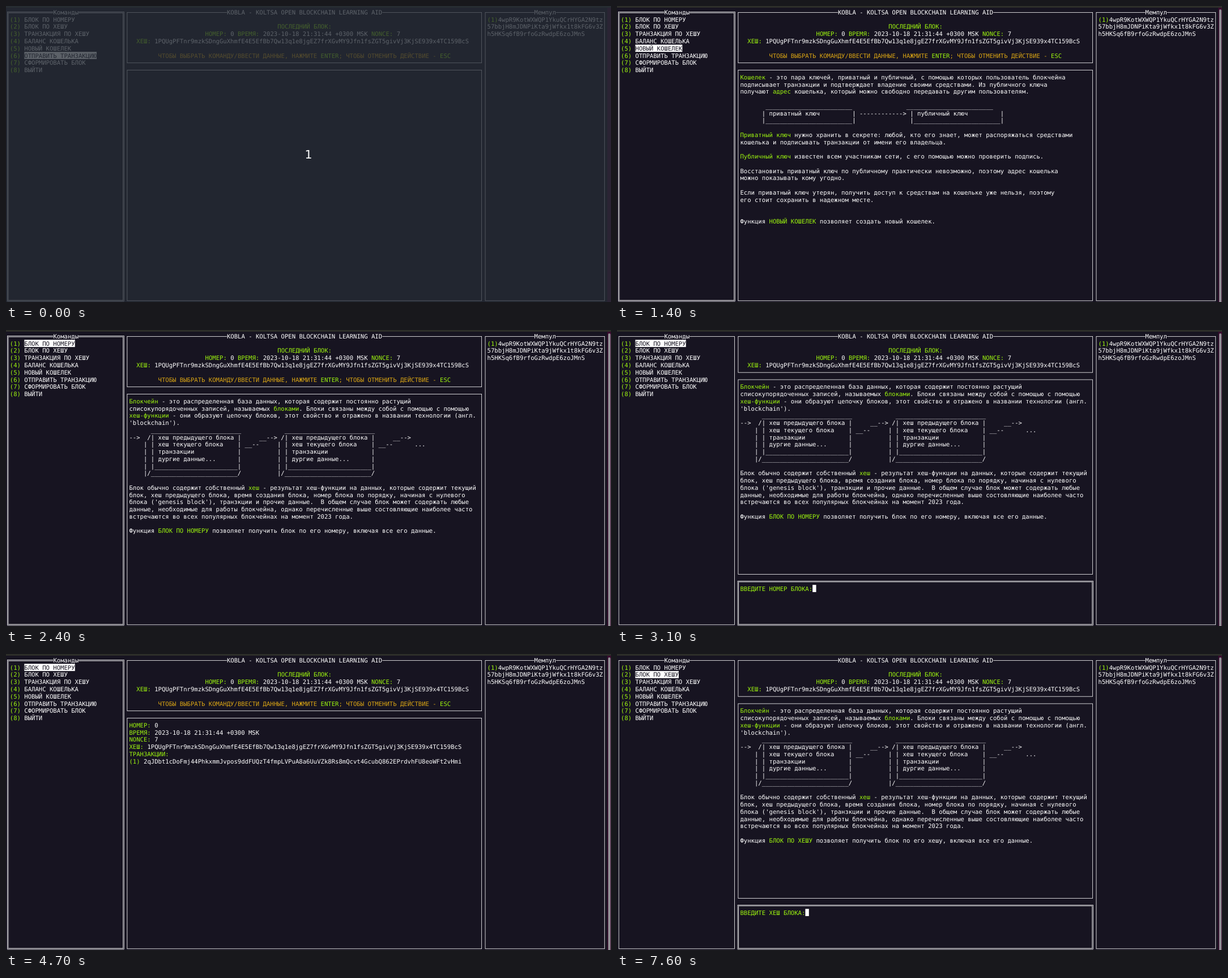
These frames come from a looping animation (1068 by 524 pixels, 8000 ms). An HTML page:

```html
<!DOCTYPE html>
<html lang="ru">
<head>
<meta charset="utf-8">
<title>KOBLA</title>
<style>
  html, body { margin: 0; width: 100%; height: 100%; overflow: hidden; background: #171421; }
  svg { display: block; width: 1068px; height: 524px; }
  text { font: 10.605px "DejaVu Sans Mono", monospace; white-space: pre; text-rendering: geometricPrecision; }
  .count { font: 20.5px "DejaVu Sans", sans-serif; }
</style>
</head>
<body>
<svg id="stage" viewBox="0 0 1068 524"></svg>
<script>
const LOOP = 8000;
// The terminal has cells of 8 by 16 units, shown at scale U.
const U = 0.798, CW = 6.385, RH = 12.76;
const BG = '#171421', FG = '#ffffff', GREEN = '#9df50f', GOLD = '#daa514';
const stage = document.getElementById('stage');

const colX = c => 0.4 + c * CW;
const rowY = r => 4.6 + r * RH;
const bar = n => '_'.repeat(n);
const rect = (x, y, w, h, fill, extra = '') =>
  `<rect x="${x}" y="${y}" width="${w}" height="${h}" fill="${fill}" ${extra}/>`;
const cells = (c, r, n, fill = FG) => rect(colX(c), rowY(r), n * CW, RH, fill);

// Text on the character grid; {braces} mark green parts.
function print(c, r, s, fill = FG) {
  const body = s.replace(/\{(.*?)\}/g, `<tspan fill="${GREEN}">$1</tspan>`);
  return `<text x="${colX(c)}" y="${rowY(r) + 13 * U}" fill="${fill}">${body}</text>`;
}

function frame(c0, r0, c1, r1, { double = false, title = '', at = 0 } = {}) {
  const x = colX(c0) + 3.5 * U, y = rowY(r0) + 8.5 * U;
  const w = (c1 - c0) * CW, h = (r1 - r0) * RH;
  let out = '';
  for (const d of double ? [-U, U] : [0]) {
    out += rect(x + d, y + d, w - 2 * d, h - 2 * d, 'none', `stroke="${FG}" stroke-width="${U}"`);
  }
  if (title) out += cells(at, r0, title.length, BG) + print(at, r0, title);
  return out;
}

const menu = ['БЛОК ПО НОМЕРУ', 'БЛОК ПО ХЕШУ', 'ТРАНЗАКЦИЯ ПО ХЕШУ', 'БАЛАНС КОШЕЛЬКА',
  'НОВЫЙ КОШЕЛЕК', 'ОТПРАВИТЬ ТРАНЗАКЦИЮ', 'СФОРМИРОВАТЬ БЛОК', 'ВЫЙТИ'];
const hash = '1PQUgPFTnr9mzkSDngGuXhmfE4E5EfBb7Qw13q1e8jgEZ7frXGvMY9Jfn1fsZGT5givVj3KjSE939x4TC159BcS';
const stamp = '2023-10-18 21:31:44 +0300 MSK';
const mempool = ['{(1)}4wpR9KotWXWQP1YkuQCrHYGA2N9tz', '57bbjH8mJDNPiKta9jWfkx1t8kFG6v3Z',
  'h5HKSq6fB9rfoGzRwdpE6zoJMnS'];

const blockPage = (name, key) => `{Блокчейн} - это распределенная база данных, которая содержит постоянно растущий
списокупорядоченных записей, называемых {блоками}. Блоки связаны между собой с помощью с помощью
{хеш-функции} - они образуют цепочку блоков, этот свойство и отражено в названии технологии (англ.
'blockchain').
      ${bar(25)}            ${bar(25)}
-->  /| хеш предыдущего блока |     __--> /| хеш предыдущего блока |     __-->
    | | хеш текущего блока    | __--     | | хеш текущего блока    | __--      ...
    | | транзакции            |          | | транзакции            |
    | | дургие данные...      |          | | дургие данные...      |
    | |${bar(23)}|          | |${bar(23)}|
    |/${bar(24)}/          |/${bar(24)}/

Блок обычно содержит собственный {хеш} - результат хеш-функции на данных, которые содержит текущий
блок, хеш предыдущего блока, время создания блока, номер блока по порядку, начиная с нулевого
блока ('genesis block'), транзкции и прочие данные.  В общем случае блок может содержать любые
данные, необходимые для работы блокчейна, однако перечисленные выше состовляющие наиболее часто
встречаются во всех популярных блокчейнах на момент 2023 года.

Функция {${name}} позволяет получить блок по его ${key}, включая все его данные.`;

const row = (a, link, b) => `      | ${a.padEnd(40)}| ${link.padEnd(13)} | ${b.padEnd(22)}|`;
const txPage = `{Транзакция} - это одно подписанное сообщение, которое хранится в блоках блокчейна. Если смотреть
на блокчейн как на базу данных, то транзакция - это одна запись в этой базе. Идентификатором
транзакции служит {хеш} - результат хеш-функции на данных, которые содержит транзакция.

     Блок:${' '.repeat(53)}Транзакция:
       ${bar(42)}               ${bar(24)}
${row('хеш блока, хеш предыдущего блока и тд...', '', 'хеш')}
${row('-'.repeat(40), '', 'отправитель')}
${row('транзакция_1', '-'.repeat(12) + '>', 'подпись')}
${row('транзакция_2', '', 'дополнительные данные')}
${row('...', '', '...')}
      | ${'транзакция_N'.padEnd(40)}|               |${bar(23)}|
      |${bar(41)}|


Многие люди считают, что транзакции нужны исключительно для передачи {цифровых активов} - токенов,
однако возможности транзакций этим не ограничены, например, транзакция может содержать в себе
дополнительные данные - сообщение, как в банковском переводе, или другие данные, которые
отправитель хочет сохранить в блокчейне, например, фотографию.

Функция {ТРАНЗАКЦИЯ ПО ХЕШУ} позволяет получить транзакцию по ее хешу, включая все ее данные.`;

const walletIntro = `{Кошелек} - это пара ключей, приватный и публичный, с помощью которых пользователь блокчейна
подписывает транзакции и подтверждает владение своими средствами. Из публичного ключа
получают {адрес} кошелька, который можно свободно передавать другим пользователям.
`;
const balancePage = `${walletIntro}
{Баланс} кошелька складывается из всех транзакций, в которых участвовал его адрес. Чтобы узнать
баланс, достаточно просмотреть все блоки, начиная с нулевого, и сложить полученные средства,
вычитая отправленные.

Функция {БАЛАНС КОШЕЛЬКА} позволяет получить баланс кошелька по его адресу.`;
const walletPage = `${walletIntro}
       ${bar(24)}               ${bar(24)}
      | приватный ключ         | ------------> | публичный ключ         |
      |${bar(24)}|               |${bar(24)}|

{Приватный ключ} нужно хранить в секрете: любой, кто его знает, может распоряжаться средствами
кошелька и подписывать транзакции от имени его владельца.

{Публичный ключ} известен всем участникам сети, с его помощью можно проверить подпись.

Восстановить приватный ключ по публичному практически невозможно, поэтому адрес кошелька
можно показывать кому угодно.

Если приватный ключ утерян, получить доступ к средствам на кошельке уже нельзя, поэтому
его стоит сохранить в надежном месте.


Функция {НОВЫЙ КОШЕЛЕК} позволяет создать новый кошелек.`;

const resultPage = `{НОМЕР:} 0
{ВРЕМЯ:} ${stamp}
{NONCE:} 7
{ХЕШ:} ${hash}
{ТРАНЗАКЦИИ:}
{(1)} 2qJDbt1cDoFmj44PhkxmmJvpos9ddFUQzT4fmpLVPuA8a6UuVZk8Rs8mQcvt4GcubQ862EPrdvhFU8eoWFt2vHmi`;

const byNumber = blockPage(menu[0], 'номеру');
const byHash = blockPage(menu[1], 'хешу');
const askNumber = 'ВВЕДИТЕ НОМЕР БЛОКА:', askHash = 'ВВЕДИТЕ ХЕШ БЛОКА:';

const steps = [
  { t: 0, sel: 6, page: '', count: '1' },
  { t: 100, sel: 6, page: '' },
  { t: 500, sel: 6, page: '' },
  { t: 1400, sel: 5, page: walletPage },
  { t: 1500, sel: 4, page: balancePage },
  { t: 1800, sel: 3, page: txPage },
  { t: 2000, sel: 2, page: byHash },
  { t: 2400, sel: 1, page: byNumber },
  { t: 3100, sel: 1, page: byNumber, ask: askNumber, typed: '', cursor: true },
  { t: 3700, sel: 1, page: byNumber, ask: askNumber, typed: '0', cursor: true },
  { t: 4200, sel: 1, page: byNumber, ask: askNumber, typed: '0' },
  { t: 4600, sel: 1, page: byNumber },
  { t: 4700, sel: 1, page: resultPage },
  { t: 6800, sel: 2, page: byHash },
  { t: 7600, sel: 2, page: byHash, ask: askHash, typed: '', cursor: true }
];

function draw({ t, sel, page, ask, typed, cursor, count }) {
  const top = ask ? 6 : 8;
  let out = rect(0, 0, 1068, 524, BG) + rect(1061.5, 3, 6.5, 521, '#3a0c2f') + rect(0, 0, 1068, 3, '#2d2e29');
  if (t >= 500) out += rect(1063, 6, 4, 520, '#918e95', 'rx="2"');

  out += frame(0, 0, 32, 40, { double: !ask, title: 'Команды', at: 13 });
  menu.forEach((name, i) => {
    const r = i + 1, on = r === sel;
    out += print(1, r, `{(${r})}`);
    if (on) out += cells(5, r, name.length);
    out += print(5, r, name, on ? BG : FG);
  });

  out += frame(33, 0, 131, top - 1, { title: 'KOBLA - KOLTSA OPEN BLOCKCHAIN LEARNING AID', at: 61 });
  out += print(75, 2, '{ПОСЛЕДНИЙ БЛОК:}');
  out += print(55, 3, `{НОМЕР:} 0 {ВРЕМЯ:} ${stamp} {NONCE:} 7`);
  out += print(36, 4, `{ХЕШ:} ${hash}`);
  if (!ask) {
    out += print(42, 6, 'ЧТОБЫ ВЫБРАТЬ КОМАНДУ/ВВЕСТИ ДАННЫЕ, НАЖМИТЕ {ENTER}; ЧТОБЫ ОТМЕНИТЬ ДЕЙСТВИЕ - {ESC}', GOLD);
  }

  out += frame(33, top, 131, ask ? 33 : 40);
  page.split('\n').forEach((line, i) => { out += print(34, top + 1 + i, line); });

  if (ask) {
    out += frame(33, 34, 131, 40, { double: true });
    out += print(34, 35, `{${ask}}${typed}`);
    if (cursor) out += cells(34 + ask.length + typed.length, 35, 1);
  }

  out += frame(132, 0, 165, 40, { title: 'Мемпул', at: 146 });
  mempool.forEach((line, i) => { out += print(133, i + 1, line); });

  if (count) {
    out += rect(0, 0, 1068, 524, '#262d36', 'opacity=".75"');
    out += `<text class="count" x="534" y="269.5" text-anchor="middle" fill="${FG}">${count}</text>`;
  }
  stage.innerHTML = out;
}

let shown = null;
function tick() {
  const now = performance.now() % LOOP;
  const step = steps.filter(s => s.t <= now).pop();
  if (step !== shown) draw(shown = step);
  requestAnimationFrame(tick);
}
tick();
</script>
</body>
</html>
```
